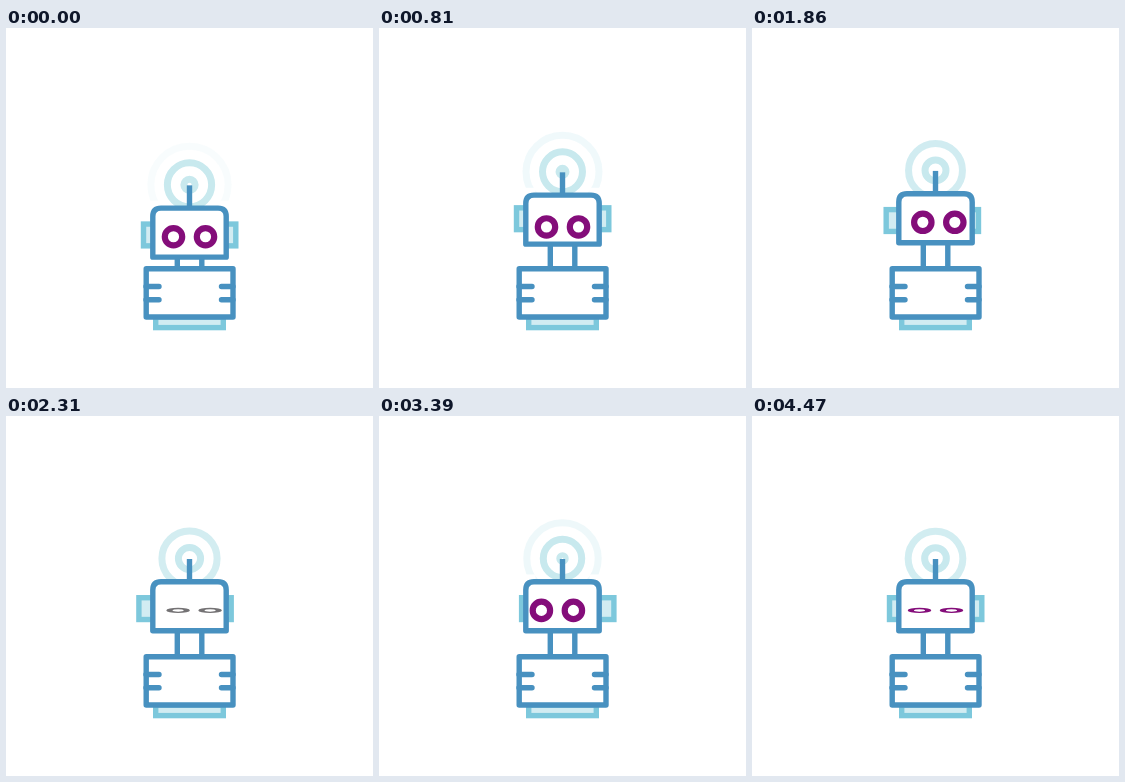
Recreate the animation shown at these times as an HTML page. Size 367 by 360 pixels, loop 4500 ms.

```html
<!DOCTYPE html>
<html lang="en">
<head>
<meta charset="utf-8">
<title>Robot</title>
<style>
  html, body { margin: 0; width: 100%; height: 100%; overflow: hidden; background: #fff; }
  svg { display: block; width: 100%; height: 100%; }
  .frame { fill: #fff; stroke: #4891c0; stroke-width: 5.4; stroke-linejoin: round; }
  .trim { fill: #d2ecf2; stroke: #7dc8dc; stroke-width: 5.4; }
  .eye { fill: #fff; stroke-width: 6.2; }
  .ring { fill: none; stroke: #c8e9ee; stroke-width: 7; }
</style>
</head>
<body>
<svg viewBox="0 0 367 360">
  <clipPath id="signal"><path d="M-60-60H60V16H27V30H-27V16H-60Z"/></clipPath>
  <rect class="trim" x="149.7" y="289" width="67.6" height="10.6"/>
  <path id="neck" class="frame"/>
  <path class="frame" d="M140.2 240.7H227V289H140.2Z"/>
  <path class="frame" d="M140 258.5H153M140 271.7H153M227 258.5H215.500M227 271.7H215.500" stroke-linecap="round"/>
  <g id="head">
    <g transform="translate(183.5 142.500)"><g id="rings" clip-path="url(#signal)"></g></g>
    <rect id="ears" class="trim" x="137.500" y="181.7" width="92.3" height="21.8"/>
    <path class="frame" d="M183.500 143V165"/>
    <path class="frame" d="M146.8 214.8V174Q146.8 165.8 155 165.8H212Q220.2 165.8 220.2 174V214.8Z"/>
    <g id="eyes">
      <circle class="eye" cx="-16" r="8.7"/>
      <circle class="eye" cx="16" r="8.7"/>
    </g>
  </g>
</svg>
<script>
  const LOOP = 4500;
  const RING_GAP = 16.5;
  const RING_PERIOD = 1300 / 3;
  const $ = id => document.getElementById(id);
  const [head, neck, ears, eyes, ringGroup] = ['head', 'neck', 'ears', 'eyes', 'rings'].map($);

  const rings = Array.from({ length: 3 }, () => {
    const ring = document.createElementNS('http://www.w3.org/2000/svg', 'circle');
    ring.setAttribute('class', 'ring');
    return ringGroup.appendChild(ring);
  });

  const clamp = v => Math.min(1, Math.max(0, v));
  const smooth = v => v * v * (3 - 2 * v);
  const ramp = (t, from, to) => smooth(clamp((t - from) / (to - from)));
  const elastic = t => t <= 0 ? 0 : 1 + 2 ** (-10 * t) * Math.sin((t - 0.075) * Math.PI * 2 / 0.3);
  const blink = (t, at) => 1 - smooth(clamp(Math.abs(t - at) / 120));
  const move = (el, x, y, more = '') => el.setAttribute('transform', `translate(${x} ${y})${more}`);

  function drawRings(t) {
    const base = (5.6 + RING_GAP * t / RING_PERIOD) % RING_GAP;
    rings.forEach((ring, i) => {
      const r = base + i * RING_GAP;
      ring.setAttribute('r', r);
      ring.setAttribute('opacity', clamp((41 - r) / 17));
    });
  }

  function draw(t) {
    const lift = 14.4 * (1 - elastic(t / 2500));
    // Eyes and ears slide in opposite directions as the head turns.
    const turn = 4.6 * ramp(t, 1600, 2000) - 9.7 * ramp(t, 2335, 2690) + 5.1 * ramp(t, 3800, 4220);
    const nod = 3.2 * (ramp(t, 520, 800) - ramp(t, 1050, 1350));
    const first = blink(t, 2310);
    const closed = Math.max(first, blink(t, 4470));

    move(head, 0, lift);
    move(ears, -turn, -nod);
    move(eyes, 183.5 + turn, 194.4 + nod, ` scale(1 ${1 - 0.78 * closed})`);
    eyes.setAttribute('stroke', first > 0.7 ? '#747274' : '#840d7a');
    neck.setAttribute('d', `M171.3 ${214 + lift}V240M195.8 ${214 + lift}V240`);
    drawRings(t);
  }

  const start = performance.now();
  function tick() {
    draw((performance.now() - start) % LOOP);
    requestAnimationFrame(tick);
  }
  tick();
</script>
</body>
</html>
```
